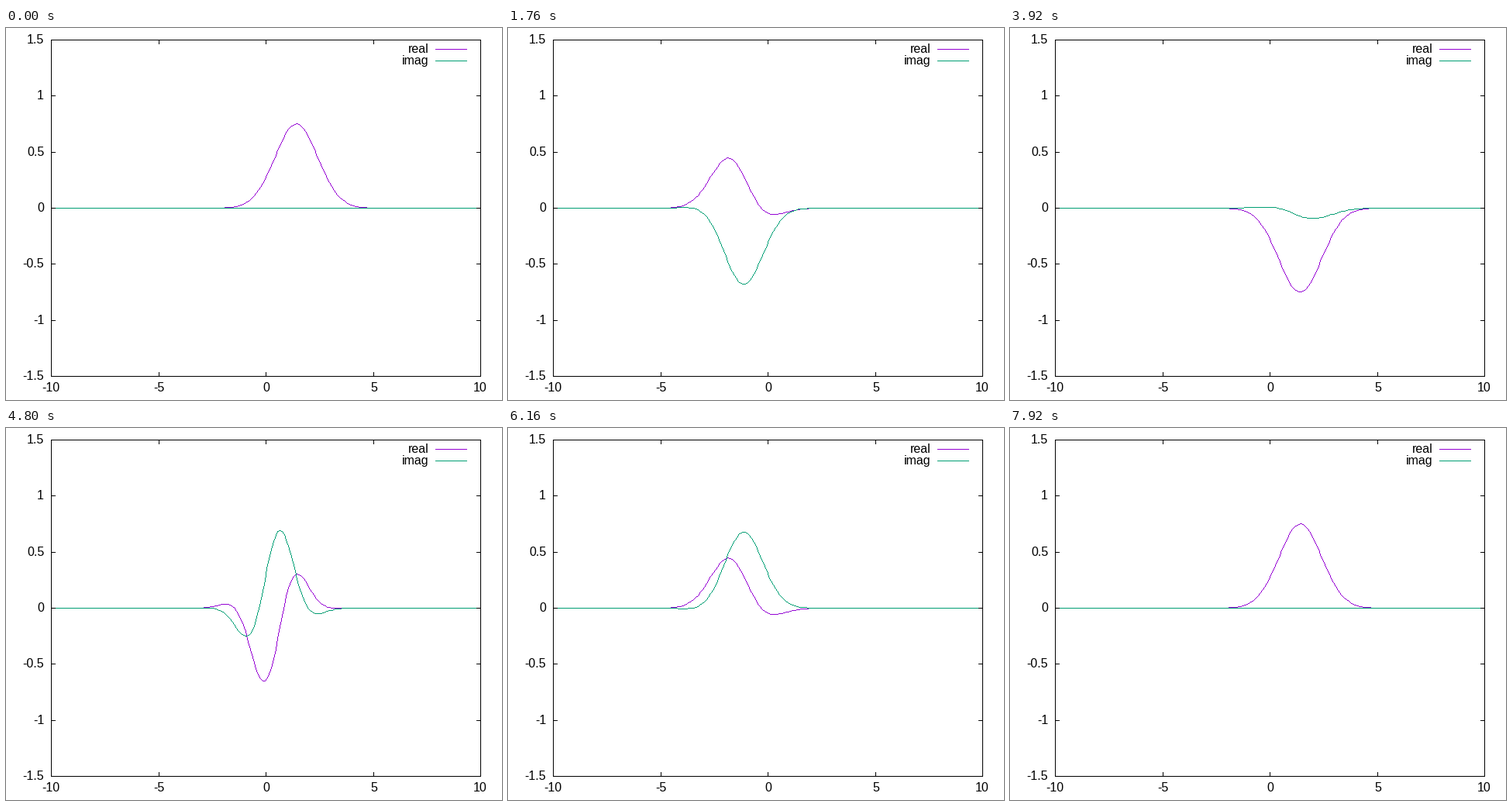
Recreate the animation shown at these times as a matplotlib script. Size 640x480 px, loop 8000 ms.

```python
import numpy as np
import matplotlib.pyplot as plt
from matplotlib.animation import FuncAnimation
from matplotlib.patches import Rectangle

W, H, DPI = 640, 480, 100
FRAMES, INTERVAL = 100, 80

# Plot area in pixels, counted from the lower left corner
LEFT, RIGHT, BOTTOM, TOP = 58, 612, 30, 464
XMAX, YMAX = 10, 1.5
TICK = 5
FONT_PX = 16
REAL, IMAG = "#9400d3", "#009e73"

# Glyph advances in em; other glyphs are as wide as a digit
ADVANCE = {"-": 0.333, ".": 0.278, "r": 0.333, "l": 0.222, "i": 0.222, "m": 0.833}

fig = plt.figure(figsize=(W / DPI, H / DPI), dpi=DPI, facecolor="white")
ax = fig.add_axes([0, 0, 1, 1])
ax.set_xlim(0, W)
ax.set_ylim(0, H)
ax.axis("off")


def nearest(v):
    return np.floor(np.asarray(v) + 0.5)


def to_px(x):
    return nearest(LEFT + (x + XMAX) * (RIGHT - LEFT) / (2 * XMAX))


def to_py(y):
    return nearest(BOTTOM + (y + YMAX) * (TOP - BOTTOM) / (2 * YMAX))


def bar(x0, y0, x1, y1, color="black"):
    """Fill whole pixels from (x0, y0) to (x1, y1), both included."""
    ax.add_patch(Rectangle((x0, y0), x1 - x0 + 1, y1 - y0 + 1, facecolor=color,
                           linewidth=0, antialiased=False, zorder=3))


def label(x, y, s, align):
    """Write s at baseline y; align is 0.5 for centred, 1 for right-aligned."""
    width = FONT_PX * sum(ADVANCE.get(c, 0.556) for c in s)
    ax.text(nearest(x - align * width), y, s, family="Liberation Sans",
            fontsize=FONT_PX * 72 / DPI, ha="left", va="baseline", zorder=4)


def draw_frame():
    for y in (BOTTOM, TOP):
        bar(LEFT, y, RIGHT, y)
    for x in (LEFT, RIGHT):
        bar(x, BOTTOM, x, TOP)
    for v in range(-10, 11, 5):
        x = to_px(v)
        bar(x, BOTTOM, x, BOTTOM + TICK)
        bar(x, TOP - TICK, x, TOP)
        label(x, 11, str(v), 0.5)
    for v in np.arange(-1.5, 1.6, 0.5):
        y = to_py(v)
        bar(LEFT, y, LEFT + TICK, y)
        bar(RIGHT - TICK, y, RIGHT, y)
        label(49, y - 4, f"{v:g}", 1)
    for name, y, color in (("real", 452, REAL), ("imag", 437, IMAG)):
        label(546, y - 4, name, 1)
        bar(554, y, 594, y, color)


xs = np.linspace(-XMAX, XMAX, 200)
px = to_px(xs)
cols = np.arange(LEFT, RIGHT + 1)
edges = np.arange(LEFT, RIGHT + 2)


def wave(t):
    """Coherent state of the harmonic oscillator, displaced by sqrt(2)."""
    q, p = np.sqrt(2) * np.cos(t), -np.sqrt(2) * np.sin(t)
    phase = p * xs - q * p / 2 - t / 2
    return np.pi ** -0.25 * np.exp(-(xs - q) ** 2 / 2 + 1j * phase)


def spans(values):
    """Lower and upper edge of a one-pixel curve in each pixel column."""
    py = to_py(values)
    a = np.interp(cols - 0.5, px, py)
    b = np.interp(cols + 0.5, px, py)
    mid = nearest(np.interp(cols, px, py))
    low, high = np.minimum(a, b), np.maximum(a, b)
    steep = high - low > 1
    return np.where(steep, np.ceil(low), mid), np.where(steep, np.ceil(high), mid + 1)


def add_curve(color, zorder):
    flat = np.full(len(cols), to_py(0))
    return ax.stairs(flat + 1, edges, baseline=flat, fill=True, color=color,
                     linewidth=0, antialiased=False, zorder=zorder)


draw_frame()
real_curve = add_curve(REAL, 1)
imag_curve = add_curve(IMAG, 2)


def update(i):
    psi = wave(4 * np.pi * i / (FRAMES - 1))
    for curve, values in ((real_curve, psi.real), (imag_curve, psi.imag)):
        low, high = spans(values)
        curve.set_data(high, edges, low)
    return real_curve, imag_curve


anim = FuncAnimation(fig, update, frames=FRAMES, interval=INTERVAL,
                     repeat=True, repeat_delay=0)
plt.show()
```
